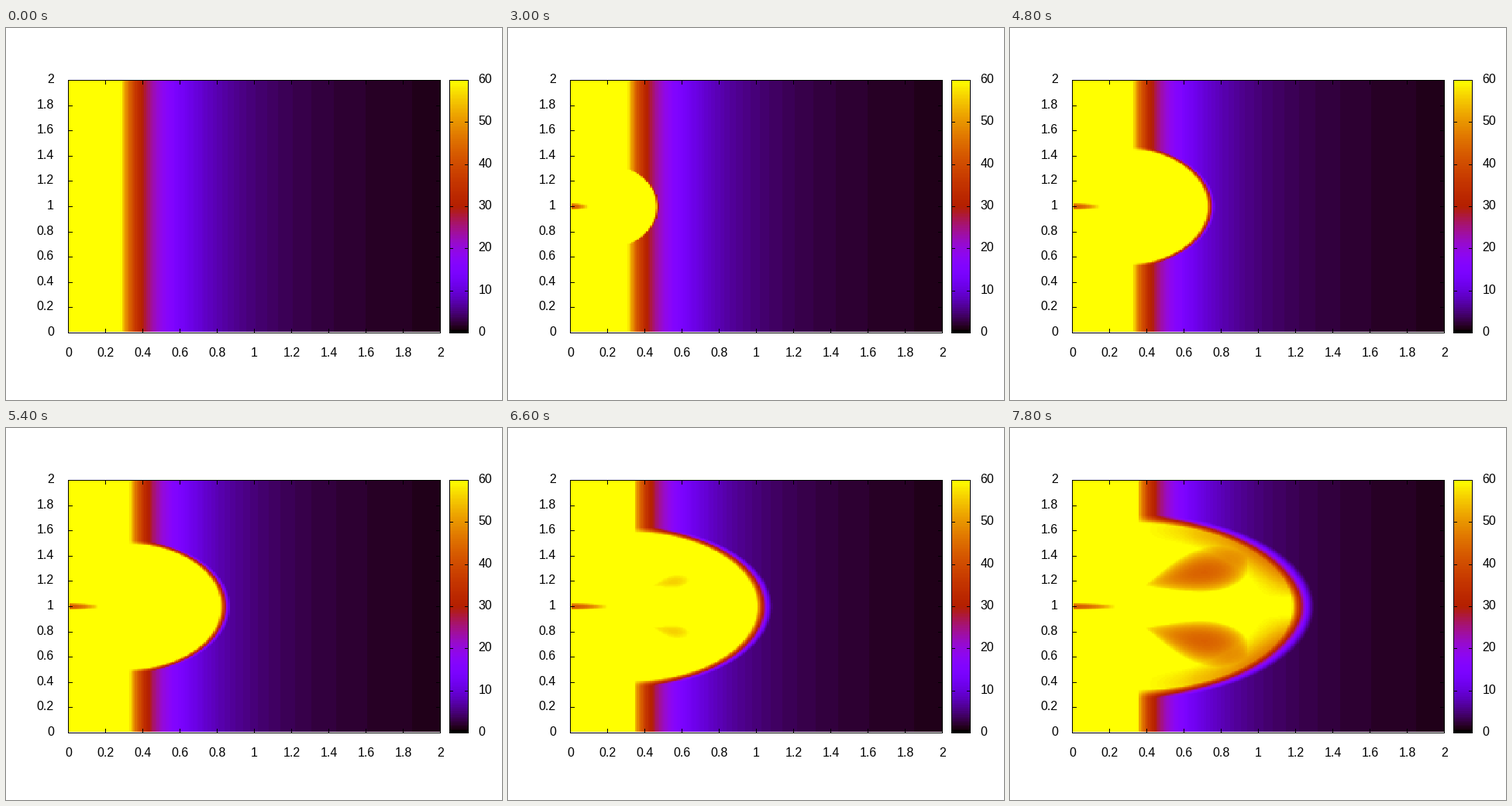
Write a matplotlib script that moves like this. It is 640 by 480 pixels and loops after 8000 ms.

```python
import numpy as np
import matplotlib.pyplot as plt
from matplotlib.animation import FuncAnimation
from matplotlib.patches import Rectangle

LEFT, RIGHT, TOP, BOTTOM = 80, 560, 67, 393
VMAX, LEVELS = 60, 128
UNIT = 240                      # pixels per x unit
MID = 230.5                     # pixel row of the symmetry axis

KEYS = [3, 5, 7, 9, 13, 17, 21, 25]
TIP = [0.28, 0.315, 0.385, 0.463, 0.633, 0.82, 1.005, 1.183]
HALF = [4, 18, 34, 47, 66, 80, 95, 107]
SHELL = [1, 1.5, 2.5, 4, 8, 13, 20, 29]


def palette(v):
    level = np.clip(np.floor(v / VMAX * LEVELS), 0, LEVELS - 1)
    g = level / (LEVELS - 1)
    blue = np.clip(np.sin(2 * np.pi * g), 0, 1)
    return np.stack([np.sqrt(g), g ** 3, blue], axis=-1)


def cell_centres(first, last, start, size):
    pixels = np.arange(first, last) + 0.5
    return start + (np.floor((pixels - start) / size) + 0.5) * size


X, Y = np.meshgrid(cell_centres(LEFT + 1, RIGHT, LEFT, 2.4),
                   np.abs(cell_centres(TOP + 1, BOTTOM - 1, MID - 0.8, 1.6) - MID))


def ambient(step):
    x = (X - LEFT) / UNIT
    age = step / 25
    origin = x - 0.062 * age * (0.36 / x) ** 1.3
    v = 4.8 / np.maximum(origin, 0.05) ** 2
    return np.where(x < 0.283 + 0.075 * age, VMAX, np.minimum(v, VMAX))


def add_bubble(v, step):
    if step < 4:
        return v
    tip, half, shell = (np.interp(step, KEYS, row) for row in (TIP, HALF, SHELL))
    base = LEFT + UNIT * (0.283 + 0.003 * step) + max(0, step - 5) * 0.22
    reach = max(LEFT + UNIT * tip - base, 1)
    power = 1.4 + 0.5 * np.clip((step - 9) / 8, 0, 1)
    dx = np.maximum(X - base, 0)
    inner = (dx / reach) ** power + (Y / half) ** 2
    outer = (dx / (reach + shell)) ** power + (Y / (half + 0.4 * shell)) ** 2

    # late on, the flanks thin out just behind the shell
    flank = np.sin(np.pi * np.clip((Y / half - 0.1) / 0.95, 0, 1)) * np.clip(dx / 70, 0, 1)
    fade = np.clip((step - 21) / 4, 0, 1) * 13
    top = VMAX - fade * flank * np.clip((inner - 0.64) / 0.36, 0, 1)

    q = np.clip((inner - 1) / np.maximum(inner - outer, 1e-9), 0, 1)
    wall = v + np.maximum(top - v, 0) * (1 - q) ** 1.3
    return np.where(inner <= 1, top, np.where(outer < 1, wall, v))


def lobes(step):
    """Depth of the teardrop hollows on both sides of the axis."""
    if step <= 20:
        return 0
    p = (step - 21) / 4
    start, end = 187 - 12 * p, 233 + 73 * p
    scale = 0.28 + 0.72 * p
    u = np.clip((X - start) / (end - start), 0, 1)
    low = 27 + scale * (18 * u ** 6 - 9 * np.sin(np.pi * 0.8 * u))
    high = 27 + scale * (1 + 50 * np.sin(np.pi * 0.72 * u))
    s = np.clip((Y - low) / (high - low), 0, 1)
    along = np.abs(np.sin(np.pi * u ** 1.25)) ** 0.6
    across = np.abs(np.sin(np.pi * s ** 0.85)) ** 0.85
    return (1 + 3.1 * (step - 20)) * along * across


def needle(step):
    """Depth of the thin streak growing from the left wall."""
    if step == 0:
        return 0
    u = (X - 82) / (2.05 * step + 3)
    width = 4.8 - 2.2 * np.clip(u, 0, 1)
    shape = np.clip(1 - u ** 2, 0, 1) * np.clip(1 - (Y / width) ** 2, 0, 1)
    return np.where(X > 82, 19 * min(1, step / 4) * shape, 0)


def field(step):
    v = add_bubble(ambient(step), step)
    return palette(v - lobes(step) - needle(step))


fig = plt.figure(figsize=(6.4, 4.8), dpi=100, facecolor="white")
ax = fig.add_axes([0, 0, 1, 1])
ax.axis("off")

heat = ax.imshow(field(0), extent=(LEFT + 1, RIGHT, BOTTOM - 1, TOP + 1),
                 interpolation="nearest", aspect="auto")
scale_rows = (BOTTOM - np.arange(TOP, BOTTOM) - 0.5) / (BOTTOM - TOP) * VMAX
ax.imshow(palette(scale_rows)[:, None], extent=(572, 597, BOTTOM, TOP),
          interpolation="nearest", aspect="auto")
ax.set_xlim(0, 640)
ax.set_ylim(480, 0)


def line(x0, y0, x1, y1):
    """Black one-pixel line covering both end pixels."""
    x, y = min(x0, x1), min(y0, y1)
    ax.add_patch(Rectangle((x, y), abs(x1 - x0) + 1, abs(y1 - y0) + 1,
                           facecolor="black", linewidth=0, zorder=3))


def frame(x0, x1):
    for y in (TOP, BOTTOM):
        line(x0, y, x1, y)
    for x in (x0, x1):
        line(x, TOP, x, BOTTOM)


def label(x, baseline, value, align):
    ax.text(x, baseline, f"{value:g}", ha=align, va="baseline",
            family="Liberation Sans", fontsize=11.52, color="black")


frame(LEFT, RIGHT)
frame(572, 596)
for i in range(11):
    x = LEFT + 48 * i
    y = round(BOTTOM - (BOTTOM - TOP) * i / 10)
    line(x, BOTTOM, x, BOTTOM - 5)
    line(x, TOP, x, TOP + 5)
    line(LEFT, y, LEFT + 5, y)
    line(RIGHT, y, RIGHT - 5, y)
    label(x + 0.5, 424, i / 5, "center")
    label(62, y + 4, i / 5, "right")
for i in range(7):
    y = round(BOTTOM - (BOTTOM - TOP) * i / 6)
    line(572, y, 576, y)
    line(596, y, 592, y)
    label(609.5, y + 4, 10 * i, "left")


def update(i):
    heat.set_data(field(max(0, i // 3 - 1)))
    return [heat]


anim = FuncAnimation(fig, update, frames=80, interval=100, repeat=True,
                     repeat_delay=0, blit=False)
plt.show()
```
